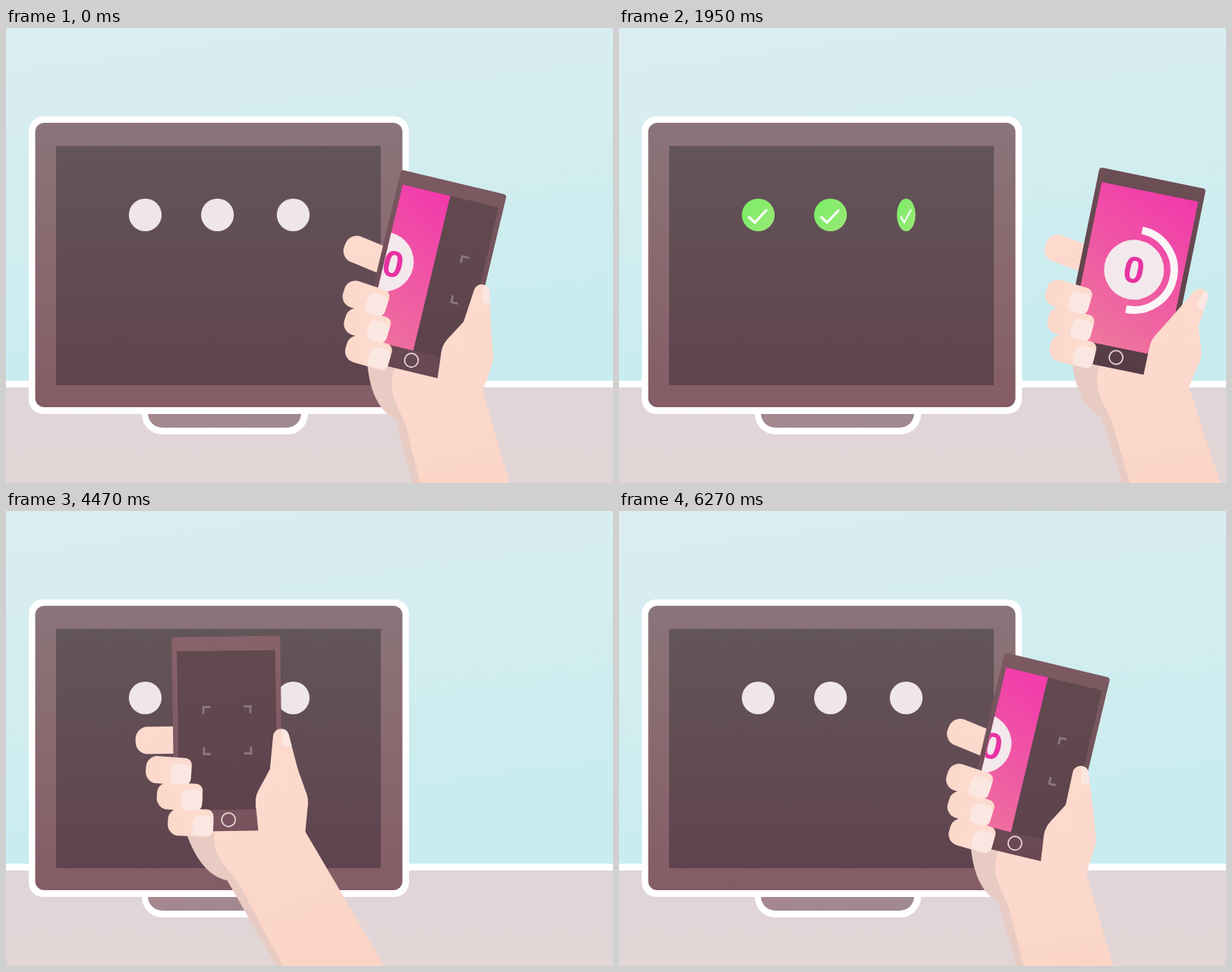
An HTML page with a canvas for the animation above (6300 ms loop, 800x600 px).

```html
<!DOCTYPE html>
<html lang="en">
<head>
<meta charset="utf-8">
<title>Phone scan</title>
<style>
html, body { margin: 0; width: 100%; height: 100%; overflow: hidden; background: #d4edf0; }
canvas { display: block; width: 800px; height: 600px; }
</style>
</head>
<body>
<canvas id="stage" width="800" height="600"></canvas>
<script>
const ctx = document.getElementById('stage').getContext('2d');
const LOOP = 6300, STEP = 30, START = 3600;
const WHITE = '#ffffff', NAIL = '#fbe7e2', PALE = '#eee6e8';
const rad = d => d * Math.PI / 180;
const lerp = (a, b, k) => a + (b - a) * k;
const ramp = (t, a, b) => Math.min(1, Math.max(0, (t - a) / (b - a)));
const ease = u => (1 - Math.cos(Math.PI * u)) / 2;
const glide = (t, a, b) => ease(ramp(t, a, b));
const mix = (a, b, k) => 'rgb(' + a.map((v, i) => Math.round(lerp(v, b[i], k))) + ')';

function linear(x0, y0, x1, y1, ...stops) {
  const g = ctx.createLinearGradient(x0, y0, x1, y1);
  stops.forEach((c, i) => g.addColorStop(i / (stops.length - 1), c));
  return g;
}

function box(x, y, w, h, r, fill) {
  ctx.beginPath();
  ctx.roundRect(x, y, w, h, r);
  ctx.fillStyle = fill;
  ctx.fill();
}

function disc(x, y, r, fill) {
  ctx.beginPath();
  ctx.arc(x, y, r, 0, 7);
  ctx.fillStyle = fill;
  ctx.fill();
}

function line(pts, color, width) {
  ctx.beginPath();
  pts.forEach(p => ctx.lineTo(p[0], p[1]));
  ctx.strokeStyle = color;
  ctx.lineWidth = width;
  ctx.stroke();
}

// Hull of two circles
function taper(x0, y0, r0, x1, y1, r1, fill) {
  const dir = Math.atan2(y1 - y0, x1 - x0);
  const open = Math.acos((r0 - r1) / Math.hypot(x1 - x0, y1 - y0));
  ctx.beginPath();
  ctx.arc(x0, y0, r0, dir + open, dir - open + 2 * Math.PI);
  ctx.arc(x1, y1, r1, dir - open, dir + open);
  ctx.closePath();
  ctx.fillStyle = fill;
  ctx.fill();
}

function room() {
  ctx.fillStyle = linear(0, 0, 60, 470, '#dbedf1', '#d3edf0', '#c8ecf0');
  ctx.fillRect(0, 0, 800, 470);
  ctx.fillStyle = linear(0, 474, 0, 600, '#e0d5d8', '#e2d5d6');
  ctx.fillRect(0, 470, 800, 130);
  ctx.fillStyle = WHITE;
  ctx.fillRect(0, 465, 800, 9);
  box(179, 490, 219, 46, [0, 0, 27, 27], WHITE);
  box(187, 490, 202, 37, [0, 0, 19, 19], linear(187, 0, 389, 0, '#a5878e', '#9f8990'));
  box(30, 116.5, 501, 392.5, 19, WHITE);
  box(38.5, 125, 484, 375, 12, linear(0, 125, 0, 500, '#8a757a', '#89696f', '#845c65'));
  ctx.fillStyle = linear(0, 156, 0, 471, '#625559', '#624c54', '#5f434e');
  ctx.fillRect(66, 155.5, 428, 315.5);
}

function lamps(t) {
  ctx.save();
  ctx.beginPath();
  ctx.rect(66, 156, 428, 315);
  ctx.clip();
  [183.5, 278.7, 378.5].forEach((x, i) => {
    const rise = 1 - ramp(t, START + 70 * i, START + 480 + 70 * i);
    const fall = Math.max(0, t - 8703 - 72 * i);
    const turn = glide(t, 7000 + 500 * i, 7400 + 500 * i);
    ctx.save();
    ctx.translate(x, 246.5 + 250 * rise * rise + 0.00109 * fall * fall);
    ctx.scale(Math.max(0.01, Math.abs(Math.cos(Math.PI * turn))), 1);
    if (turn < 0.5) disc(0, 0, 21.6, PALE);
    else {
      disc(0, 0, 21.6, linear(-20, -10, 20, 14, '#7eee6a', '#98e873'));
      line([[-13, 2], [-4.5, 10], [11.5, -7]], WHITE, 3.2);
    }
    ctx.restore();
  });
  ctx.restore();
}

// Half a minute counted down on a ring
function timer(t, lag) {
  const q = ramp(t, 6900, 8200);
  ctx.fillStyle = linear(45, -223, -45, -13, '#f23bab', '#ef58a4', '#ee789c');
  ctx.fillRect(-65, -223, 130, 210);
  disc(0, -118, 39.5, '#f3e8eb');
  if (q > 0) {
    ctx.beginPath();
    ctx.arc(0, -118, 53, -Math.PI / 2, -Math.PI / 2 + Math.PI * q);
    ctx.strokeStyle = '#fbf5f7';
    ctx.lineWidth = 10;
    ctx.stroke();
  }
  ctx.fillStyle = '#e832a2';
  ctx.font = 'bold 49px "Liberation Sans", Arial, sans-serif';
  ctx.textAlign = 'center';
  ctx.fillText(t < 6900 ? 0 : Math.round(30 * (1 - q)), lag, -101);
}

function phone(t) {
  const slide = glide(t, 5910, 6695);
  box(-71.5, -241.5, 143, 256.5, 4, linear(0, -242, 0, 15,
    mix([135, 99, 106], [108, 78, 85], slide), mix([120, 82, 92], [86, 60, 69], slide)));
  ctx.save();
  ctx.beginPath();
  ctx.rect(-65, -223, 130, 210);
  ctx.clip();
  ctx.fillStyle = linear(0, -223, 0, -13, '#62494f', '#5d424c');
  ctx.fillRect(-65, -223, 130, 210);
  ctx.save();
  ctx.translate(130 * slide, -118);
  for (const sx of [-1, 1]) for (const sy of [-1, 1])
    line([[sx * 22, sy * 31], [sx * 31, sy * 31], [sx * 31, sy * 22]], '#8b767b', 3);
  ctx.restore();
  if (slide > 0) {
    ctx.translate(130 * (slide - 1), 0);
    timer(t, 25 * (1 - slide));
  }
  ctx.restore();
  ctx.beginPath();
  ctx.arc(0, 0, 9, 0, 7);
  ctx.strokeStyle = '#ecd9d9';
  ctx.lineWidth = 1.7;
  ctx.stroke();
}

function arm(inset, fill) {
  ctx.beginPath();
  ctx.moveTo(-58 + 2 * inset, 10);
  ctx.bezierCurveTo(-46 + inset, 50, -28 + 1.4 * inset, 74 - 0.6 * inset,
    -3 + 0.9 * inset, 80 + 0.5 * inset);
  ctx.lineTo(175 + 0.1 * inset, 400);
  ctx.lineTo(319, 400);
  ctx.lineTo(99, 14);
  ctx.lineTo(60, -30);
  ctx.lineTo(-20, -30);
  ctx.closePath();
  ctx.fillStyle = fill;
  ctx.fill();
}

function finger(x, y, tilt) {
  ctx.save();
  ctx.translate(x, y);
  ctx.rotate(rad(tilt));
  box(-30, -18, 60, 36, [15, 9, 9, 15], linear(-30, 0, 30, 0, '#fcd8ca', '#fddcd0'));
  box(3, -10, 27, 27, [9, 8, 8, 6], NAIL);
  ctx.restore();
}

// sweep: 0 on the screen, 1 leaning outwards
function thumb(sweep, skin) {
  const palm = lerp(58, 75, sweep), knuckle = lerp(60, 79, sweep);
  const reach = lerp(64, 43, sweep);
  taper(palm, -22, 34.5, 70, 25, 30, skin);
  taper(palm, -22, 34.5, knuckle, -60, 19, skin);
  ctx.translate(knuckle, -60);
  ctx.rotate(rad(lerp(-66, 18, sweep)));
  taper(0, 0, 19, 0, -reach, 10.5, skin);
  ctx.clip();
  box(1, -reach - 12, 15, 26, 6, NAIL);
}

// Where the phone's home button is, and its turn
function pose(t) {
  const left = 1 - ramp(t, 3745, 4865);
  const back = glide(t, 4700, 5600);
  const carry = ease(ramp(t, 5845, 6970) ** 0.613);
  const swing = Math.sin(Math.PI * carry);
  const drift = glide(t, 7590, 8880);
  const drop = ramp(t, 9100, 9750) ** 2;
  return {
    x: 222 + 202 * left + 100 * back + 345 * carry - 23 * drift,
    y: 386 + 480 * left ** 3 + 46 * back + 4 * carry + 4 * swing - 3 * drift + 460 * drop,
    turn: -4 + 9 * left + 13.6 * back + 2.6 * carry + 2.4 * swing - 1.2 * drift
  };
}

function hand(t) {
  const { x, y, turn } = pose(t);
  const grip = glide(t, 4850, 5500);
  const lift = glide(t, 5880, 6270);
  const sweep = 0.74 * (1 - grip) + glide(t, 5886, 6526);
  ctx.save();
  ctx.translate(x, y);
  ctx.rotate(rad(turn));
  const skin = linear(-40, -120, 100, 200, '#fddacc', '#fcd9cc', '#fad4c6');

  arm(0, '#e8cbc2');
  arm(20, skin);

  ctx.save();
  ctx.translate(-90, lerp(-106, -123, lift));
  ctx.rotate(rad(9 * lift));
  box(-31, -18, 70, 36, 16, skin);
  ctx.restore();

  phone(t);
  for (let i = 2; i >= 0; i--)
    finger(-78 + lerp(14, 10, grip) * i, -66 + 34.5 * i, 5 - i);
  thumb(sweep, skin);
  ctx.restore();
}

// Time runs from the empty monitor at START to START + LOOP.
function draw(now) {
  let t = Math.floor(now % LOOP / STEP) * STEP;
  if (t < START) t += LOOP;
  room();
  lamps(t);
  hand(t);
}

let begin = null;
function tick(now) {
  if (begin === null) begin = now;
  draw(now - begin);
  requestAnimationFrame(tick);
}
draw(0);
requestAnimationFrame(tick);
</script>
</body>
</html>
```
